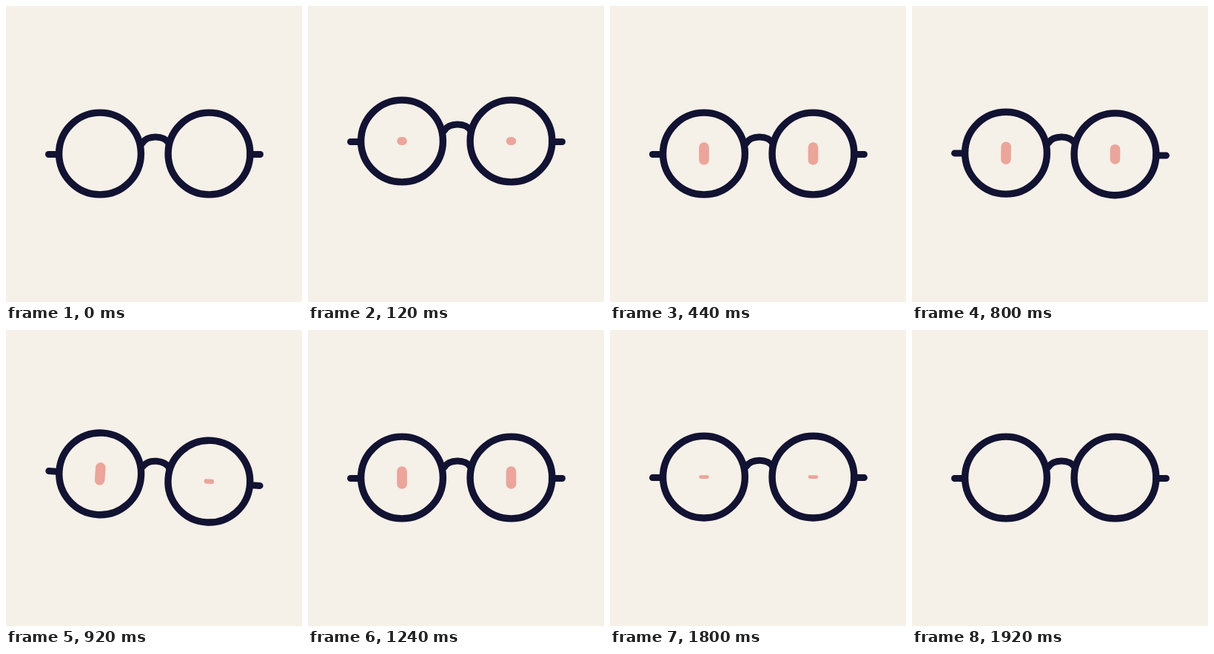
Recreate the animation shown at these times as an HTML page with a canvas. Size 400x400 px, loop 2 s.

```html
<!DOCTYPE html>
<html lang="en">
<head>
<meta charset="utf-8">
<title>Winking glasses</title>
<style>
  html, body { margin: 0; width: 100%; height: 100%; overflow: hidden; background: #f5f0e8; }
  canvas { display: block; width: 400px; height: 400px; }
</style>
</head>
<body>
<canvas id="stage"></canvas>
<script>
const SIZE = 400, LOOP = 2000, STEP = 40;
const PAPER = '#f5f0e8', NAVY = '#121232', PINK = '#eba59b';
const LEFT = 127, RIGHT = 274.5, MID = 199.5;
const EYE_W = 13.6, EYE_H = 30.6, WINK_H = 6.2;

const canvas = document.getElementById('stage');
const ctx = canvas.getContext('2d');
const dpr = window.devicePixelRatio || 1;
canvas.width = canvas.height = SIZE * dpr;

const smooth = p => p * p * (3 - 2 * p);
const easeOut = p => 1 - Math.pow(1 - p, 1.5);

// Each key: [time, value, easing towards this key]
const HOP = [
  [0, 0], [120, -17], [320, 8], [440, 0],
  [1640, 0], [1720, 8, easeOut], [1840, -4], [1920, 0]
];
const OPEN = [[40, 0], [240, 1], [1680, 1], [1840, 0]];
const WINK = [[760, 0], [920, 1], [1080, 1], [1240, 0]];

function valueAt(keys, t) {
  if (t <= keys[0][0]) return keys[0][1];
  for (let i = 1; i < keys.length; i++) {
    const [t0, v0] = keys[i - 1];
    const [t1, v1, ease = smooth] = keys[i];
    if (t <= t1) return v0 + (v1 - v0) * ease((t - t0) / (t1 - t0));
  }
  return keys[keys.length - 1][1];
}

function eye(x, h) {
  if (h < 0.1) return;
  ctx.beginPath();
  ctx.roundRect(x - EYE_W / 2, MID - h / 2, EYE_W, h, Math.min(EYE_W, h) / 2);
  ctx.fill();
}

function lens(x) {
  ctx.beginPath();
  ctx.arc(x, MID, 55.4, 0, Math.PI * 2);
  ctx.stroke();
}

function temple(from, to) {
  ctx.beginPath();
  ctx.moveTo(from, 200.5);
  ctx.lineTo(to, 200.5);
  ctx.stroke();
}

function bridge() {
  ctx.beginPath();
  ctx.moveTo(184, 185.5);
  ctx.bezierCurveTo(191, 174.3, 213, 174.3, 220, 185.5);
  ctx.stroke();
}

function draw(t) {
  const open = valueAt(OPEN, t), wink = valueAt(WINK, t);
  ctx.setTransform(dpr, 0, 0, dpr, 0, 0);
  ctx.fillStyle = PAPER;
  ctx.fillRect(0, 0, SIZE, SIZE);

  ctx.translate(200.7, 200 + valueAt(HOP, t));
  ctx.rotate(wink * 4 * Math.PI / 180);
  ctx.translate(-200.7, -200);

  ctx.fillStyle = PINK;
  eye(LEFT, EYE_H * open);
  eye(RIGHT, (EYE_H + (WINK_H - EYE_H) * wink) * open);

  ctx.strokeStyle = NAVY;
  ctx.lineWidth = 9.4;
  ctx.lineCap = 'round';
  lens(LEFT);
  lens(RIGHT);
  ctx.lineWidth = 9;
  temple(57.5, 71);
  temple(329.7, 343.5);
  bridge();
}

const start = performance.now();
function tick() {
  const t = (performance.now() - start) % LOOP;
  draw(Math.floor(t / STEP) * STEP);
  requestAnimationFrame(tick);
}
tick();
</script>
</body>
</html>
```
